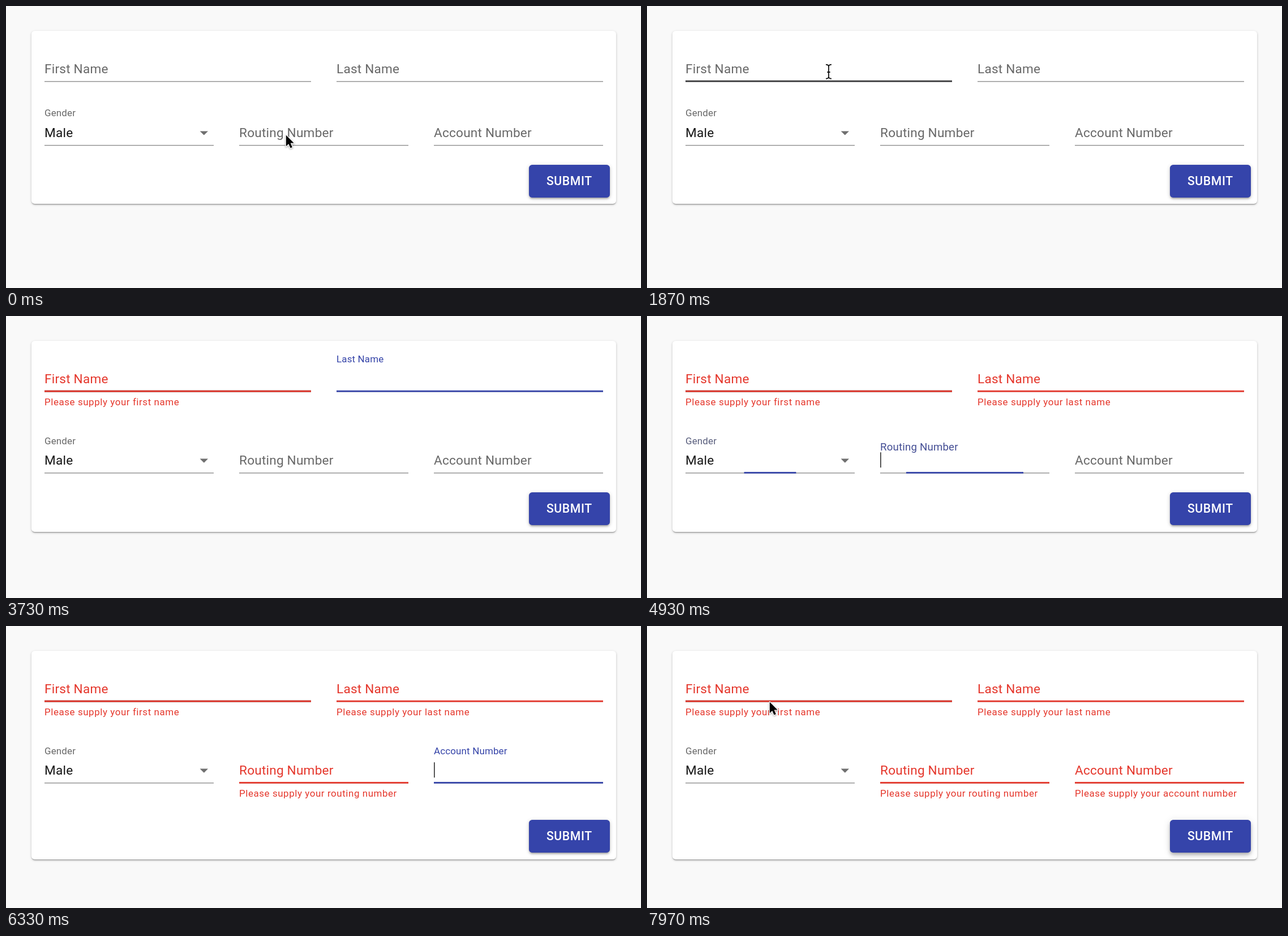
Write an HTML page that moves like this. It is 1122x499 px and loops after 8 s.

```html
<!DOCTYPE html>
<html lang="en">
<head>
<meta charset="utf-8">
<title>Form validation</title>
<style>
  html, body { margin: 0; width: 100%; height: 100%; overflow: hidden; background: #f9f9f9; }
  body { position: relative; font-family: Roboto, Arial, sans-serif; }
  .card, .button, svg { position: absolute; }
  .card {
    left: 45px; top: 43.5px; width: 1033px; border-radius: 5.6px; background: #fff;
    box-shadow: 0 1.4px 4.2px rgba(0,0,0,.2), 0 1.4px 1.4px rgba(0,0,0,.14), 0 2.8px 1.4px -1.4px rgba(0,0,0,.12);
  }
  .button {
    left: 924px; width: 142.6px; height: 58.4px; border-radius: 5.6px;
    background: #3544aa; color: #fff; text-align: center;
    font-size: 21.2px; font-weight: 500; line-height: 58.4px; letter-spacing: .02857em;
  }
  svg { left: 0; top: 0; }
  .label, .value { font-size: 22.6px; letter-spacing: .00938em; }
  .value { fill: #151515; }
  .help { font-size: 16.95px; letter-spacing: .03333em; fill: #e5372c; }
</style>
</head>
<body>
<div class="card"></div>
<div class="button">SUBMIT</div>
<svg width="1122" height="499" viewBox="0 0 1122 499"></svg>
<script>
const LOOP = 8000, FADE = 200, ROW = 113, GROW = 31.2;
const GRAY = [104, 104, 104], BLUE = [52, 67, 168], RED = [229, 55, 44];
const LINE = [142, 142, 142], DARK = [56, 56, 58];
const HOVER = 870, CLICK = 2100, HIDE = 2500, SHOW = 7540;
const TABS = [3150, 4050, 4863, 5950, 6950];

const fields = [
  { label: 'First Name', x: 68, w: 471, row: 0, from: CLICK, to: TABS[0] },
  { label: 'Last Name', x: 584, w: 471, row: 0, from: TABS[0], to: TABS[1] },
  { label: 'Gender', x: 68, w: 299, row: 1, from: TABS[1], to: TABS[2], value: 'Male' },
  { label: 'Routing Number', x: 412, w: 299, row: 1, from: TABS[2], to: TABS[3] },
  { label: 'Account Number', x: 756, w: 299, row: 1, from: TABS[3], to: TABS[4] }
];

// time, x, y of the pointer
const path = [
  [0, 494, 228], [320, 494, 228], [840, 332, 146], [1120, 321, 116],
  [SHOW, 321, 116], [7900, 216, 134], [LOOP, 216, 134]
];

const svg = document.querySelector('svg');
const card = document.querySelector('.card').style;
const button = document.querySelector('.button').style;

function set(el, attrs) {
  for (const key in attrs) el.setAttribute(key, attrs[key]);
}
function add(parent, tag, attrs, text) {
  const el = document.createElementNS('http://www.w3.org/2000/svg', tag);
  set(el, attrs);
  if (text) el.textContent = text;
  return parent.appendChild(el);
}
const clamp = v => Math.min(1, Math.max(0, v));
const lerp = (a, b, k) => a + (b - a) * k;
const mix = (a, b, k) => `rgb(${a.map((v, i) => Math.round(lerp(v, b[i], k)))})`;
const show = (el, on) => { el.style.display = on ? '' : 'none'; };

// cubic-bezier(0, 0, .2, 1), solved by bisection
function easeOut(x) {
  x = clamp(x);
  let lo = 0, hi = 1;
  for (let i = 0; i < 18; i++) {
    const s = (lo + hi) / 2;
    if (.6 * (1 - s) * s * s + s * s * s < x) lo = s; else hi = s;
  }
  return 3 * (1 - lo) * lo * lo + lo * lo * lo;
}
const since = (t, start, span = FADE) => easeOut((t - start) / span);

for (const f of fields) {
  const { x, w } = f;
  f.g = add(svg, 'g', {});
  if (f.value) {
    f.shade = add(f.g, 'rect', { x, y: 89.5, width: w, height: 44, fill: 'rgba(0,0,0,.05)' });
    add(f.g, 'text', { x, y: 118.5, class: 'value' }, f.value);
    add(f.g, 'path', { d: 'M342.6 108.4h14.4l-7.2 7.2z', fill: '#6f6f6f' });
  } else {
    const help = `Please supply your ${f.label.toLowerCase()}`;
    f.help = add(f.g, 'text', { x, y: 158, class: 'help' }, help);
    f.caret = add(f.g, 'rect', { x: x + .2, y: 97, width: 1.4, height: 27, fill: '#111' });
  }
  f.line = add(f.g, 'rect', { x, width: w });
  f.bar = add(f.g, 'rect', { y: 131.7, height: 2.8 });
  f.text = add(f.g, 'text', { class: 'label' }, f.label);
}

const arrow = add(svg, 'path', {
  d: 'M.8.6v19.6l4.5-4.3 3.2 7.4 3.4-1.4-3.2-7.4h6z',
  fill: '#000', stroke: '#fff', 'stroke-width': 2.6, 'stroke-linejoin': 'round', 'paint-order': 'stroke'
});
arrow.style.filter = 'drop-shadow(0 1.5px 1.5px rgba(0,0,0,.35))';
const beam = add(svg, 'g', { fill: 'none' });
for (const [color, width] of [['#fff', 4], ['#111', 1.8]]) {
  add(beam, 'path', {
    d: 'M-5-12.3Q-.4-12.3 0-9Q.4-12.3 5-12.3M-5 12.7Q-.4 12.7 0 9.4Q.4 12.7 5 12.7M0-9V9.4M-2.6 1H2.6',
    stroke: color, 'stroke-width': width
  });
}

function drawField(f, t, dy) {
  const { x, w } = f;
  const inK = since(t, f.from), outK = since(t, f.to), k = inK - outK;
  const active = t >= f.from && t < f.to;
  const failed = !f.value && t >= f.to;
  set(f.g, { transform: `translate(0 ${dy})` });

  const up = f.value ? 1 : k;
  const fill = t < f.to ? mix(GRAY, BLUE, inK) : mix(BLUE, failed ? RED : GRAY, outK);
  set(f.text, { transform: `translate(${x} ${lerp(119, 82.3, up)}) scale(${lerp(1, .75, up)})`, fill });

  const hover = f === fields[0] && t >= HOVER;
  set(f.line, {
    y: hover ? 131.7 : 132.9, height: hover ? 2.8 : 1.4,
    fill: hover ? mix(LINE, DARK, since(t, HOVER)) : mix(LINE, LINE, 0)
  });
  const span = failed ? w : w * k;
  set(f.bar, { x: x + (w - span) / 2, width: span, fill: mix(failed ? RED : BLUE, RED, 0) });

  if (f.value) {
    show(f.shade, active);
  } else {
    show(f.help, failed);
    show(f.caret, active && (t - f.from) % 1000 < 500);
  }
}

function drawPointer(t) {
  const visible = t < HIDE || t >= SHOW;
  const i = Math.max(1, path.findIndex(p => p[0] > t));
  const [t0, x0, y0] = path[i - 1], [t1, x1, y1] = path[i];
  const u = clamp((t - t0) / (t1 - t0)), k = u * u * (3 - 2 * u);
  const x = lerp(x0, x1, k), y = lerp(y0, y1, k);
  const overInput = x > 182 && x < 539 && y > 89 && y < 134;
  show(arrow, visible && !overInput);
  show(beam, visible && overInput);
  set(overInput ? beam : arrow, { transform: `translate(${x} ${y})` });
}

function buttonShadow(k) {
  const part = (y, blur, spread, alpha) => `0 ${y}px ${blur}px ${spread}px rgba(0,0,0,${alpha})`;
  return [
    part(lerp(1.4, 2.8, k), lerp(7, 5.6, k), lerp(0, -1.4, k), .2),
    part(lerp(2.8, 5.6, k), lerp(2.8, 7, k), 0, .14),
    part(lerp(4.2, 1.4, k), lerp(1.4, 14, k), lerp(-2.8, 0, k), .12)
  ].join();
}

function draw(t) {
  const top = t >= TABS[0] ? GROW : 0;
  const all = top + (t >= TABS[3] ? GROW : 0);
  card.height = 306.8 + all + 'px';
  button.top = 280.7 + all + 'px';
  button.boxShadow = buttonShadow(since(t, TABS[4], 250));
  for (const f of fields) drawField(f, t, f.row * (ROW + top));
  drawPointer(t);
}

const start = performance.now();
function tick() {
  draw((performance.now() - start) % LOOP);
  requestAnimationFrame(tick);
}
tick();
</script>
</body>
</html>
```
